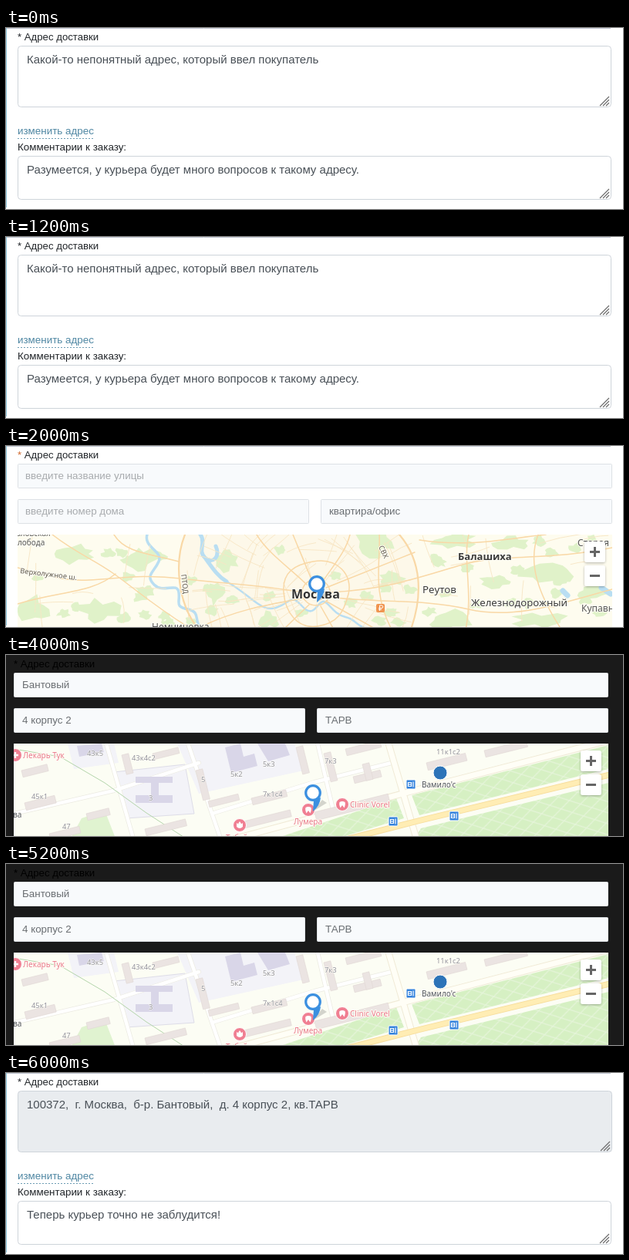
An HTML page for the animation above (8 s loop, 800x235 px).

```html
<!DOCTYPE html>
<html lang="ru">
<head>
<meta charset="utf-8">
<title>Адрес доставки</title>
<style>
html, body { margin: 0; width: 100%; height: 100%; overflow: hidden; background: #fff; }
svg { display: block; width: 800px; height: 235px; }
text { font-family: "Liberation Sans", Arial, sans-serif; font-size: 13.4px; white-space: pre; }
.scene { visibility: hidden; animation: show 8s step-end infinite; }
.s2 { animation-delay: -6s; }
.s3 { animation-delay: -4s; }
.s4 { animation-delay: -2s; }
@keyframes show {
  0% { visibility: visible; }
  25%, 100% { visibility: hidden; }
}
.label { fill: #212529; }
.title { font-size: 13.2px; }
.area { font-size: 15px; fill: #495057; }
.box { fill: #fff; stroke: #ced4da; }
.off { fill: #e9ecef; }
.link { fill: #4f87a3; }
.field { fill: #f8fafc; stroke: #dde1e5; }
.s3 .field { stroke: #8d9194; }
.hint { fill: #a8abae; }
.value { fill: #6a6e72; }
.line { fill: none; stroke-linejoin: round; stroke-linecap: round; }
.map text { font-family: "Noto Sans", "Open Sans", sans-serif; paint-order: stroke; stroke: #fffef5; stroke-width: 2px; stroke-linejoin: round; }
.map .town { font-size: 13.2px; font-weight: 500; fill: #3a3a3a; }
.map .big { font-weight: 600; font-size: 13px; }
.map .city { font-size: 16px; font-weight: 600; fill: #333; }
.map .vil { font-size: 12px; fill: #555; }
.map .road { font-size: 9.3px; fill: #5d564b; }
.map .small { font-size: 10px; fill: #555; }
.map .num { font-size: 9.4px; fill: #94949f; stroke-width: 1px; }
.map .poi { font-size: 10px; font-weight: 500; fill: #e8778a; }
.map .dark { fill: #50545e; }
</style>
</head>
<body>
<svg viewBox="0 0 800 235">
<defs>
  <clipPath id="clip1"><rect x="15" y="115" width="771" height="120"/></clipPath>
  <clipPath id="clip2"><rect x="10" y="115" width="771" height="120"/></clipPath>
  <pattern id="park" width="26" height="16" patternUnits="userSpaceOnUse" patternTransform="rotate(-14)">
    <rect width="26" height="16" fill="#d6f0c3"/>
    <path d="M0 16 26 0M0 0 26 16" stroke="#e6f5da" stroke-width="1.2"/>
  </pattern>
  <filter id="soft" x="-30%" y="-30%" width="160%" height="170%">
    <feDropShadow dx="0" dy="1" stdDeviation="1.4" flood-opacity=".3"/>
  </filter>
  <g id="frame">
    <path d="M0 .5H784" stroke="#c3c8d3"/>
    <path d="M.5 0V233" stroke="#8fc8de"/>
  </g>
  <path id="grip" d="M0 12 12 0M4 12 12 4M8 12 12 8" stroke="#6d6d6d" stroke-width="1.2"/>
  <g id="order">
    <use href="#frame"/>
    <text class="label title" x="15" y="16">* Адрес доставки</text>
    <text class="link" x="15" y="138">изменить адрес</text>
    <path d="M15 143.5H115" stroke="#6c9cb3" stroke-dasharray="2 2"/>
    <text class="label" x="15" y="159">Комментарии к заказу:</text>
    <rect class="box" x="15.5" y="166.5" width="769" height="56" rx="4"/>
    <use href="#grip" x="770" y="209"/>
  </g>
  <g id="zoom">
    <g filter="url(#soft)" fill="#fff">
      <rect x="750" y="124" width="27" height="27" rx="3"/>
      <rect x="750" y="155" width="27" height="27" rx="3"/>
    </g>
    <path d="M757 137.5H770M763.5 131V144M757 168.500H770" stroke="#666" stroke-width="3"/>
  </g>
  <g id="pin">
    <path d="M0 24 12 9 18 13Z" fill="#000" opacity=".16"/>
    <path d="M1 9 0 24Q9 17 10 6Z" fill="#3b8fe0"/>
    <circle r="9.3" fill="#fff" stroke="#3b8fe0" stroke-width="3.2"/>
  </g>
  <g id="stop">
    <rect x="-6" y="-6" width="12" height="12" rx="1.500" fill="#3382dc" stroke="#fff"/>
    <path d="M-3.500-2.500H.5V2.500H-3.500ZM-3.500 0H.5M3-3.500V3.500" fill="none" stroke="#fff" stroke-width="1.200"/>
  </g>
  <circle id="spot" r="8.5" fill="#f07f92" stroke="#fff"/>
  <g id="tooth">
    <use href="#spot"/>
    <path d="M-3.500-3Q0-5 3.500-3 4.500 0 2.500 4.500L0 1-2.500 4.500Q-4.500 0-3.500-3Z" fill="#fff"/>
  </g>
  <g id="care">
    <use href="#spot"/>
    <path d="M0-4V4M-4 0H4" stroke="#fff" stroke-width="2.4"/>
  </g>
  <g id="tulip">
    <use href="#spot"/>
    <path d="M-4-3Q0 1 4-3V2Q0 6-4 2ZM0-5 2-2 0 0-2-2Z" fill="#fff"/>
  </g>
  <g id="fields">
    <rect class="field" x="15.5" y="23.5" width="770" height="31" rx="1"/>
    <rect class="field" x="15.5" y="69.5" width="377" height="31" rx="1"/>
    <rect class="field" x="408.5" y="69.5" width="377" height="31" rx="1"/>
  </g>
</defs>

<g class="scene">
  <rect width="800" height="235" fill="#fff"/>
  <use href="#order"/>
  <rect class="box" x="15.5" y="23.5" width="769" height="79" rx="4"/>
  <use href="#grip" x="770" y="89"/>
  <text class="area" x="27" y="46">Какой-то непонятный адрес, который ввел покупатель</text>
  <text class="area" x="27" y="189">Разумеется, у курьера будет много вопросов к такому адресу.</text>
</g>

<g class="scene s2">
  <rect width="800" height="235" fill="#fff"/>
  <use href="#frame"/>
  <text class="label title" x="15" y="16"><tspan fill="#d0662a">*</tspan> Адрес доставки</text>
  <use href="#fields"/>
  <text class="hint" x="25" y="43">введите название улицы</text>
  <text class="hint" x="25" y="89">введите номер дома</text>
  <text class="value" x="419" y="89">квартира/офис</text>
  <g class="map" clip-path="url(#clip1)">
    <rect x="15" y="115" width="771" height="120" fill="#fefcef"/>
    <path d="M232 115C218 150 222 205 250 235H525C540 195 538 150 510 115Z" fill="#fdf8e9"/>
    <g id="woods" fill="#e0f2c9"></g>
    <g class="line" stroke="#b9def2">
      <path d="M183 115C178 132 204 136 198 150S180 168 192 180 222 176 224 190 218 208 236 212 242 228 254 238" stroke-width="3.5"/>
      <path d="M252 115C260 125 248 136 258 145S278 144 272 130M258 145C270 162 276 170 286 176" stroke-width="5"/>
      <path d="M286 176C318 194 330 216 350 210S368 190 384 208 404 200 412 202 424 218 440 222 450 232 470 238" stroke-width="2.5"/>
      <path d="M772 184 784 192M722 188 728 194" stroke-width="7"/>
    </g>
    <g id="streets" class="line" stroke="#f8e6c4" stroke-width=".9"></g>
    <g class="line" stroke="#f9d8a6" stroke-width="1.5">
      <path d="M15 158C50 166 70 176 108 174S180 166 226 172 330 180 384 190"/>
      <path d="M60 115C92 140 112 146 140 166S190 206 236 235M15 205C70 188 110 192 142 166M140 115C155 140 190 140 224 150"/>
      <path d="M232 115C218 150 222 205 250 238M510 115C540 150 540 195 525 238" stroke-width="2.2"/>
      <path d="M325 115C340 140 370 160 390 180M372 115 398 178M446 115C440 140 420 160 408 180M530 138 415 184"/>
      <path d="M420 190C490 186 526 174 585 156S700 150 786 132M418 196C480 204 540 198 600 212S720 204 786 186"/>
      <path d="M384 198C340 206 300 212 252 235M393 206 360 238M408 208 425 238M416 202 480 238M484 115C486 150 474 190 500 238"/>
      <path d="M600 115C592 150 606 190 596 238M690 115C676 152 690 192 720 238M536 122C600 132 650 120 700 115"/>
      <ellipse cx="402" cy="190" rx="18" ry="17"/>
      <path d="M398 150C430 144 450 168 444 192S430 230 404 234 362 216 360 190 374 154 398 150Z"/>
    </g>
    <text class="small" x="13" y="117">вловская</text>
    <text class="small" x="15" y="129">лобода</text>
    <text class="road" transform="translate(18 165) rotate(7)">Верхолужное ш.</text>
    <text class="road" transform="translate(227 167) rotate(83)">ПТОД</text>
    <text class="road" transform="translate(483 131) rotate(65)">СВХ</text>
    <text class="vil" x="189" y="239">Немчиновка</text>
    <text class="city" x="370" y="198">Москва</text>
    <text class="town big" x="586" y="148">Балашиха</text>
    <text class="town" x="540" y="191">Реутов</text>
    <text class="town" x="603" y="208">Железнодорожный</text>
    <text class="vil" x="741" y="130">Старая</text>
    <text class="vil" x="746" y="215">Купавна</text>
    <rect x="480" y="205" width="11" height="11" rx="2" fill="#f0944f"/>
    <path d="M484.500 214V207H487a1.700 1.700 0 0 1 0 3.500H483M483 212.300H487" fill="none" stroke="#fff"/>
    <use href="#pin" x="403" y="179"/>
    <use href="#zoom"/>
  </g>
</g>

<g class="scene s3">
  <rect width="800" height="235" fill="#1a1a1a"/>
  <text class="title" x="10" y="16" fill="#000">* Адрес доставки</text>
  <use href="#fields" x="-5"/>
  <text class="value" x="21" y="43">Бантовый</text>
  <text class="value" x="21" y="89">4 корпус 2</text>
  <text class="value" x="414" y="89">ТАРВ</text>
  <g class="map" clip-path="url(#clip2)">
    <rect x="10" y="115" width="771" height="120" fill="#fcfdf4"/>
    <path d="M84 238 98 212 128 202 142 238Z" fill="#e0f3d0"/>
    <path d="M140 152 232 142 244 206 156 212ZM222 115H374L386 150 250 180ZM80 115H140L146 140 88 148Z" fill="#f3f3f8"/>
    <path d="M140 152 232 142 244 206 156 212Z" fill="none" stroke="#deddE8"/>
    <path d="M350 238 506 186 516 212 430 238ZM526 182 781 117V148L536 208ZM530 238 538 225 781 166V238Z" fill="url(#park)"/>
    <g id="lanes"></g>
    <path class="line" d="M280 243 525 177 781 111M496 115 532 238" stroke="#f0ead6" stroke-width="9"/>
    <path class="line" d="M280 243 525 177 781 111M496 115 532 238" stroke="#fffef6" stroke-width="7"/>
    <path class="line" d="M415 246 536 215 781 156" stroke="#f7dd9c" stroke-width="8"/>
    <path class="line" d="M415 246 536 215 781 156" stroke="#ffedb4" stroke-width="6"/>
    <path class="line" d="M10 122 70 132 128 166 182 205 236 240" stroke="#b4d5ab"/>
    <g id="blocks"></g>
    <path d="M168 158H216V166H198V182H216V192H168V182H188V166H168Z" fill="#d9d6e8"/>
    <path d="M284 120 304 115 308 132 322 128 326 144 292 153ZM326 115H362L368 130 340 138ZM92 118 124 115 127 126 95 132Z" fill="#d9d6e8"/>
    <g>
      <text class="num" x="105" y="131">43к5</text>
      <text class="num" x="163" y="137">43к4с2</text>
      <text class="num" x="291" y="158">5к2</text>
      <text class="num" x="333" y="145">5к3</text>
      <text class="num" x="413" y="141">7к3</text>
      <text class="num" x="333" y="184">7к1с4</text>
      <text class="num" x="253" y="165">5</text>
      <text class="num" x="185" y="189">3</text>
      <text class="num" x="33" y="187">45к1</text>
      <text class="num" x="73" y="226">47</text>
      <text class="num" x="558" y="129">11к1с2</text>
    </g>
    <use href="#care" x="12" y="130"/>
    <use href="#tooth" x="436" y="194"/>
    <use href="#tooth" x="392" y="201"/>
    <use href="#tulip" x="303" y="221"/>
    <circle cx="563" cy="153" r="9" fill="#2d74b8" stroke="#fff"/>
    <text class="poi" x="22" y="134">Лекарь Тук</text>
    <text class="poi" x="446" y="198">Clinic Vorel</text>
    <text class="poi" x="373" y="220">Лумера</text>
    <text class="poi" x="285" y="241">Тобуй</text>
    <text class="poi dark" x="539" y="172">Вамило'с</text>
    <text class="poi dark" x="9" y="211">ва</text>
    <use href="#stop" x="525" y="168"/>
    <use href="#stop" x="502" y="216"/>
    <use href="#stop" x="581" y="209"/>
    <use href="#pin" x="398" y="179"/>
    <use href="#zoom" x="-5"/>
  </g>
</g>

<g class="scene s4">
  <rect width="800" height="235" fill="#fff"/>
  <use href="#order"/>
  <rect class="box off" x="15.5" y="23.5" width="770" height="79" rx="4"/>
  <use href="#grip" x="771" y="89"/>
  <text class="area" x="27" y="46">100372,  г. Москва,  б-р. Бантовый,  д. 4 корпус 2, кв.ТАРВ</text>
  <text class="area" x="27" y="189">Теперь курьер точно не заблудится!</text>
</g>
</svg>
<script>
let seed = 11;
const rnd = () => (seed = seed * 16807 % 2147483647) / 2147483647;
const add = (id, tag, attrs) => {
  const el = document.createElementNS("http://www.w3.org/2000/svg", tag);
  for (const k in attrs) el.setAttribute(k, attrs[k]);
  document.getElementById(id).append(el);
};

// ragged patch of forest
function wood(x, y, rx, ry) {
  const pts = [];
  for (let i = 0; i < 14; i++) {
    const a = i / 14 * Math.PI * 2, k = 0.5 + rnd() * 0.65;
    pts.push((x + Math.cos(a) * rx * k).toFixed(1) + "," + (y + Math.sin(a) * ry * k).toFixed(1));
  }
  add("woods", "polygon", { points: pts.join(" ") });
}
[[90, 140, 34, 14], [35, 212, 24, 20], [122, 214, 30, 16], [176, 146, 20, 16], [286, 150, 16, 14],
 [272, 190, 15, 18], [478, 124, 26, 20], [500, 172, 17, 10], [580, 122, 32, 12], [700, 164, 44, 14],
 [635, 176, 24, 10], [575, 226, 30, 14], [690, 226, 38, 11], [762, 190, 24, 10], [340, 226, 14, 12],
 [655, 126, 26, 10]].forEach(w => wood(...w));
for (let i = 0; i < 50; i++) wood(20 + rnd() * 760, 118 + rnd() * 115, 10, 7);

// minor streets, denser inside the ring road
for (let i = 0; i < 90; i++) {
  const inside = i < 56;
  const x = inside ? 245 + rnd() * 275 : 15 + rnd() * 770, y = 115 + rnd() * 120;
  const a = Math.atan2(y - 190, x - 402) + (i % 2 ? Math.PI / 2 : 0), r = 12 + rnd() * 22;
  const dx = Math.cos(a) * r, dy = Math.sin(a) * r;
  add("streets", "path", { d: `M${x - dx} ${y - dy}Q${x + rnd() * 8 - 4} ${y + rnd() * 8 - 4} ${x + dx} ${y + dy}` });
}

// side lanes: outline, then surface
[["#ecebe2", 6], ["#fff", 4.5]].forEach(([stroke, width]) => add("lanes", "path", {
  d: "M10 206 140 176 250 140M236 115 278 238M404 115 425 205M130 115 165 238M270 205 400 165 500 140",
  class: "line", stroke, "stroke-width": width
}));

// houses follow the tilt of the boulevard
[[20, 150, 34, 9], [24, 192, 40, 10], [56, 232, 40, 9], [150, 130, 9, 26], [190, 128, 34, 8],
 [246, 150, 9, 40], [262, 190, 40, 8], [318, 186, 46, 9], [308, 216, 62, 9], [376, 120, 9, 36],
 [412, 128, 9, 38], [440, 122, 46, 9], [400, 204, 98, 11], [450, 158, 36, 9], [462, 142, 9, 22],
 [545, 140, 52, 10], [620, 124, 56, 9], [180, 226, 54, 9], [104, 206, 30, 9]].forEach(([x, y, w, h]) =>
  add("blocks", "rect", { x, y, width: w, height: h, fill: "#ebe4e2", stroke: "#e1d8d5", "stroke-width": 0.6, transform: `rotate(-14 ${x} ${y})` }));
</script>
</body>
</html>
```
